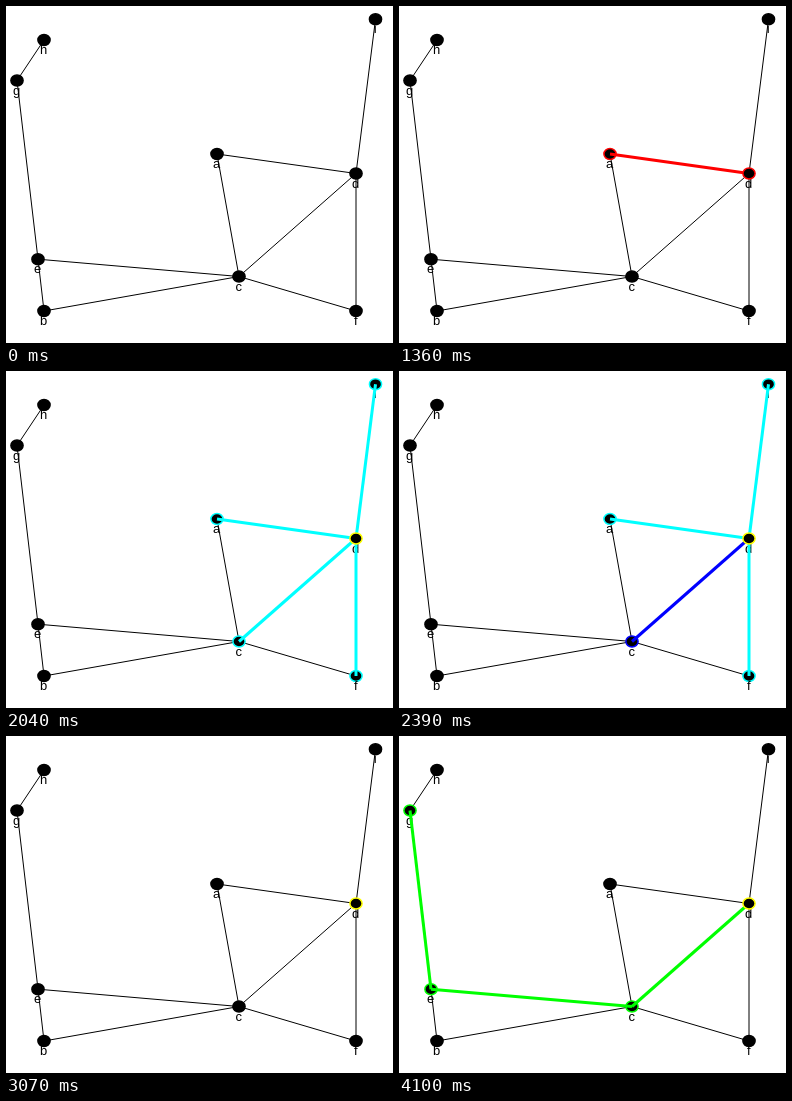
An HTML page that plays this animation: 387 by 337 pixels, repeating every 4.45 s.

```html
<!DOCTYPE html>
<html lang="en">
<head>
<meta charset="utf-8">
<title>Graph walk</title>
<style>
  html, body { margin: 0; width: 100%; height: 100%; overflow: hidden; background: #fff; }
  svg { display: block; width: 387px; height: 337px; }
  text { font: 13px "Liberation Sans", Arial, sans-serif; text-anchor: middle; }
  ellipse { stroke: #000; stroke-width: 1.5; }
  .edge { stroke: #000; stroke-width: 1; }
  .mark { stroke-width: 3; }
</style>
</head>
<body>
<svg viewBox="0 0 387 337"></svg>
<script>
const LOOP = 4450;
const HUB = 'd';
const LIME = '#0f0', RED = '#f00', CYAN = '#0ff', BLUE = '#00f', YELLOW = '#ff0';

const nodes = {
  a: [211, 148], b: [38, 305], c: [233, 270.5], d: [350, 167.5], e: [32, 253.2],
  f: [350, 305], g: [11, 74.5], h: [38, 34], i: [369.5, 13.2]
};
const edges = ['ad', 'ac', 'cd', 'df', 'di', 'cf', 'ce', 'bc', 'be', 'eg', 'gh'];

// Start time, hub ring colour, then edge colours for that step.
const steps = [
  [0, '#000', {}],
  [330, YELLOW, {}],
  [680, YELLOW, { ad: LIME }],
  [1030, YELLOW, { ad: RED }],
  [1360, RED, { ad: RED }],
  [1710, YELLOW, {}],
  [2040, YELLOW, { ad: CYAN, cd: CYAN, df: CYAN, di: CYAN }],
  [2390, YELLOW, { ad: CYAN, cd: BLUE, df: CYAN, di: CYAN }],
  [2720, BLUE, { ad: CYAN, cd: BLUE, df: CYAN, di: CYAN }],
  [3070, YELLOW, {}],
  [3400, YELLOW, { cd: LIME }],
  [3750, YELLOW, { cd: LIME, ce: LIME }],
  [4100, YELLOW, { cd: LIME, ce: LIME, eg: LIME }]
];

const svg = document.querySelector('svg');

function add(tag, attrs, text = '') {
  const el = document.createElementNS('http://www.w3.org/2000/svg', tag);
  for (const key in attrs) el.setAttribute(key, attrs[key]);
  el.textContent = text;
  svg.append(el);
  return el;
}

function addEdge([from, to], kind) {
  const [x1, y1] = nodes[from], [x2, y2] = nodes[to];
  return add('line', { x1, y1, x2, y2, class: kind });
}

function addNode(name) {
  const [cx, cy] = nodes[name];
  return add('ellipse', { cx, cy, rx: 6.1, ry: 5.5 });
}

edges.forEach(edge => addEdge(edge, 'edge'));

const dots = {}, marks = {};
for (const name in nodes) {
  if (name !== HUB) dots[name] = addNode(name);
  const [x, y] = nodes[name];
  add('text', { x: x - 0.3, y: Math.round(y + 14) }, name);
}
edges.forEach(edge => { marks[edge] = addEdge(edge, 'mark'); });
dots[HUB] = addNode(HUB); // the hub covers the marked edges

function show([, hubColor, colors]) {
  const rings = {};
  for (const edge of edges) {
    const color = colors[edge];
    marks[edge].style.stroke = color || 'none';
    if (color) for (const name of edge) rings[name] = color;
  }
  rings[HUB] = hubColor;
  for (const name in dots) dots[name].style.stroke = rings[name] || '#000';
}

let current;
function tick(now) {
  const time = now % LOOP;
  const step = steps.findLast(([start]) => start <= time);
  if (step !== current) show(current = step);
  requestAnimationFrame(tick);
}
show(current = steps[0]);
requestAnimationFrame(tick);
</script>
</body>
</html>
```
